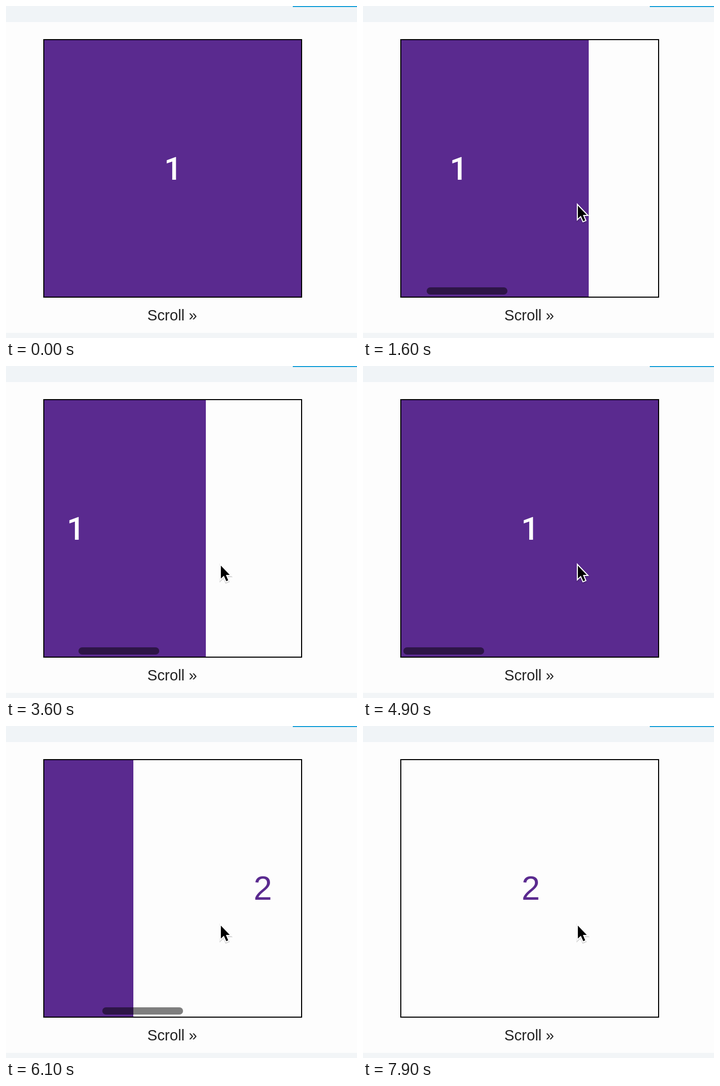
An HTML page for the animation above (8 s loop, 678x642 px).

```html
<!DOCTYPE html>
<html lang="en">
<head>
<meta charset="utf-8">
<title>Scroll snapping</title>
<style>
  html, body { margin: 0; width: 100%; height: 100%; overflow: hidden; background: #fdfdfd; }
  svg { display: block; }
  text { font-family: "Liberation Sans", Arial, sans-serif; }
  .digit { font-size: 64px; }
  .one { font: 500 61px Roboto, "Liberation Sans", sans-serif; fill: #fff; }
</style>
</head>
<body>
<svg width="678" height="642" viewBox="0 0 678 642">
  <defs>
    <clipPath id="view"><rect x="74" y="66" width="496" height="496"/></clipPath>
    <path id="arrow" d="M415 386V411L420.8 405.4L425.4 416L429.2 414.4L424.8 404H432.2Z"/>
  </defs>
  <rect width="678" height="642" fill="#fdfdfd"/>
  <rect width="678" height="31" fill="#f0f4f7"/>
  <rect y="632" width="678" height="10" fill="#f2f5f7"/>
  <rect x="554" width="124" height="2" fill="#1ba1d9"/>

  <g clip-path="url(#view)">
    <g id="pages">
      <rect x="74" y="66" width="500" height="496" fill="#5a2a8f"/>
      <text class="one" x="305.5" y="336">1</text>
      <text class="digit" x="806.2" y="336" fill="#5a2a8f">2</text>
    </g>
    <rect id="thumb" x="78" y="544" width="156" height="14" rx="7" fill-opacity=".5"/>
  </g>
  <rect x="73" y="65" width="498" height="498" fill="none" stroke="#000" stroke-width="2"/>
  <text x="273" y="608" font-size="28.8" fill="#222">Scroll »</text>

  <g id="cursor">
    <use href="#arrow" y="2" fill="none" stroke="#000" stroke-opacity=".14" stroke-width="5"/>
    <use href="#arrow" stroke="#fff" stroke-width="4" paint-order="stroke"/>
  </g>
</svg>
<script>
  const LOOP = 8000, STEP = 100, THUMB_RATIO = 3.05;
  const $ = id => document.getElementById(id);

  const linear = p => p;
  const easeOut = p => 1 - (1 - p) ** 2;
  const easeInOut = p => p * p * (3 - 2 * p);

  // Each key: time, value, easing used to reach it
  const scrollKeys = [
    [0, 0], [800, 0], [900, 6], [1000, 26], [1600, 138, easeOut], [1700, 138],
    [2400, 0, easeInOut], [3000, 0], [3700, 198, easeInOut], [3800, 198],
    [4600, 0, easeInOut], [5300, 0], [6100, 328, easeInOut], [6800, 500, easeOut]
  ];
  const fadeKeys = [
    [0, 0], [900, 0], [1000, 1], [2800, 1], [2900, .6], [3000, .8], [3100, 1],
    [7200, 1], [7500, 0]
  ];
  const cursorKeys = [[0, 1], [200, 1], [800, 0, easeOut]];

  function valueAt(keys, t) {
    const i = keys.findIndex(k => k[0] > t);
    if (i < 0) return keys[keys.length - 1][1];
    const [t0, v0] = keys[i - 1], [t1, v1, ease = linear] = keys[i];
    return v0 + (v1 - v0) * ease((t - t0) / (t1 - t0));
  }

  function draw(now) {
    const t = Math.floor(now % LOOP / STEP) * STEP;
    // Even pixels: the page is shown at double density
    const scroll = Math.round(valueAt(scrollKeys, t) / 2) * 2;
    const away = valueAt(cursorKeys, t);
    $('pages').setAttribute('transform', `translate(${-scroll} 0)`);
    $('thumb').setAttribute('x', 78 + Math.round(scroll / THUMB_RATIO));
    $('thumb').setAttribute('opacity', valueAt(fadeKeys, t));
    $('cursor').setAttribute('transform', `translate(${away * 280} ${away * 90})`);
  }

  const start = performance.now();
  function tick() {
    draw(performance.now() - start);
    requestAnimationFrame(tick);
  }
  tick();
</script>
</body>
</html>
```
